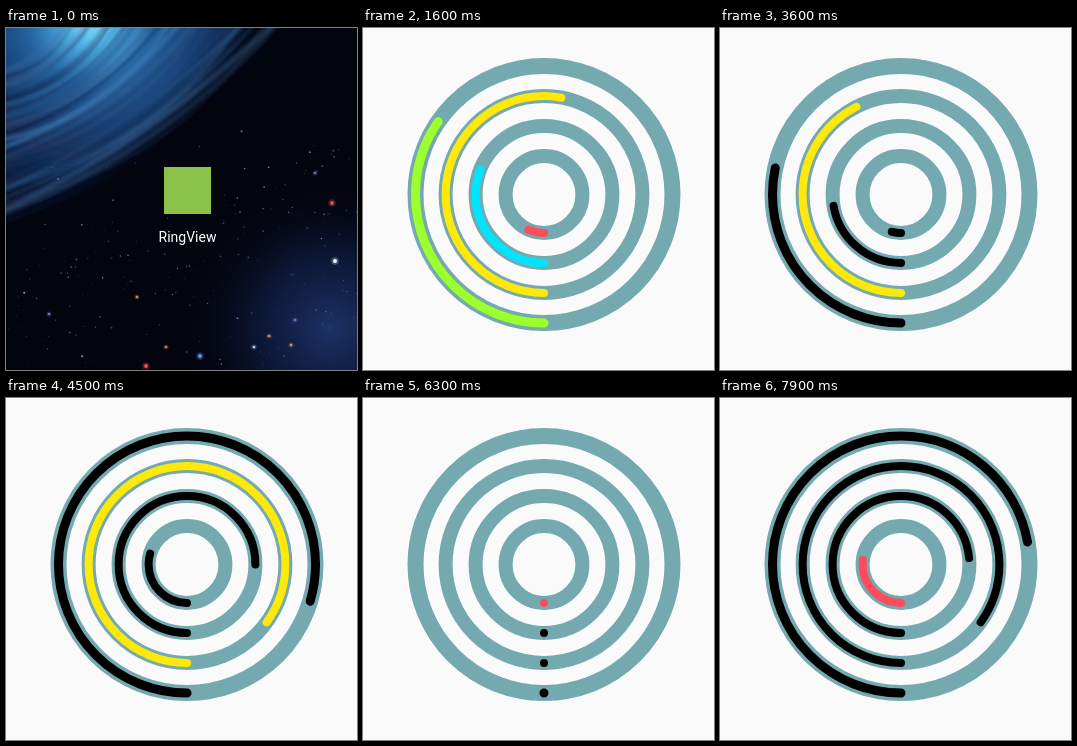
An HTML page that plays this animation: 351 by 342 pixels, repeating every 8000 ms.

```html
<!DOCTYPE html>
<html lang="en">
<head>
<meta charset="utf-8">
<title>Ring view</title>
<style>
  html, body { margin: 0; width: 100%; height: 100%; overflow: hidden; background: #fafafa; }
  svg { display: block; width: 351px; height: 342px; }
  text { font: 14px Roboto, "Open Sans", sans-serif; fill: #fff; text-anchor: middle; }
</style>
</head>
<body>
<svg id="stage" viewBox="0 0 351 342">
  <defs>
    <radialGradient id="nebula" gradientUnits="userSpaceOnUse" cx="85" cy="-8" r="250">
      <stop offset="0" stop-color="#9af0ff"/>
      <stop offset=".1" stop-color="#4fb4ea"/>
      <stop offset=".25" stop-color="#235f9d"/>
      <stop offset=".5" stop-color="#14315f"/>
      <stop offset=".8" stop-color="#0a1630"/>
      <stop offset="1" stop-color="#050917"/>
    </radialGradient>
    <radialGradient id="glow" gradientUnits="userSpaceOnUse" cx="325" cy="300" r="150">
      <stop offset="0" stop-color="#1c3266"/>
      <stop offset=".5" stop-color="#0d1a3c" stop-opacity=".8"/>
      <stop offset="1" stop-color="#03050e" stop-opacity="0"/>
    </radialGradient>
    <filter id="soft" x="-20%" y="-20%" width="140%" height="140%"><feGaussianBlur stdDeviation="9"/></filter>
    <filter id="wisp" x="-20%" y="-20%" width="140%" height="140%"><feGaussianBlur stdDeviation="1.6"/></filter>
  </defs>
  <g id="home">
    <rect width="351" height="342" fill="#03050e"/>
    <rect width="351" height="342" fill="url(#glow)"/>
    <path d="M-40 205Q165 135 262 -40H-40Z" fill="url(#nebula)" filter="url(#soft)"/>
    <g id="streaks" fill="none" filter="url(#wisp)"/>
    <g id="stars"/>
    <rect x="158" y="139" width="47" height="47" fill="#8bc34a"/>
    <text x="181.5" y="214">RingView</text>
  </g>
  <rect id="cover" width="351" height="342" fill="#fafafa"/>
  <g id="rings" fill="none"/>
</svg>
<script>
const LOOP = 8000, STEP = 100, CX = 181, CY = 166.5;
const el = id => document.getElementById(id);

function add(parent, tag, attrs) {
  const node = document.createElementNS("http://www.w3.org/2000/svg", tag);
  for (const key in attrs) node.setAttribute(key, attrs[key]);
  return parent.appendChild(node);
}

let seed = 11;
const random = () => (seed = seed * 16807 % 2147483647) / 2147483647;
const pick = list => list[Math.floor(random() * list.length)];

function drawSky() {
  for (let i = 0; i < 46; i++) {
    const reach = 0.25 + 0.85 * random();
    const y = 185 * reach, x = 275 * reach, bend = 0.5 + 0.2 * random();
    add(el("streaks"), "path", {
      d: `M-20 ${y}Q${x * bend} ${y * bend + 15} ${x} -20`,
      stroke: pick(["#3d7cb8", "#28548c", "#050b1c", "#081226", "#5470a0"]),
      "stroke-width": 1 + 5 * random(),
      opacity: (0.15 + 0.3 * random()) * (1.25 - reach * 0.7)
    });
  }
  // Two diagonal star bands over a faint scatter
  for (let i = 0; i < 300; i++) {
    const x = 351 * random(), spread = random() + random() + random() - 1.5;
    const band = i % 4;
    const y = band === 3 ? 100 + 242 * random()
      : band === 2 ? 385 - 0.33 * x + 50 * spread
      : 300 - 0.43 * x + 70 * spread;
    add(el("stars"), "circle", {
      cx: x, cy: y, r: 0.35 + 0.75 * random() ** 3,
      fill: pick(["#7f8fc8", "#a78a94", "#56699f", "#b9bfd6", "#8a5660"]),
      opacity: 0.25 + 0.6 * random()
    });
  }
  const bright = [
    [326, 175, "#e2593f"], [329, 233, "#fff"], [140, 338, "#ff5148"], [194, 328, "#5b9bff"],
    [160, 319, "#d9776b"], [248, 319, "#b8c9ff"], [131, 269, "#d8863f"], [43, 286, "#8067cf"],
    [263, 308, "#d98a62"], [289, 292, "#8c6bd0"], [285, 317, "#e0875f"], [309, 145, "#6974c0"]
  ];
  bright.forEach(([cx, cy, fill], i) => {
    const r = i < 4 ? 1.9 : 1.3;
    add(el("stars"), "circle", { cx, cy, r: r * 2, fill, opacity: 0.25 });
    add(el("stars"), "circle", { cx, cy, r, fill });
  });
}

const rings = [
  { r: 128.5, track: 16, line: 9, color: "#9cff2e", max: 318, delay: 0, span: 2177, lit: [1, 0, 1, 0] },
  { r: 98.4, track: 14, line: 8, color: "#ffe90a", max: 306, delay: 174, span: 1320, lit: [1, 1, 0, 0] },
  { r: 68.4, track: 14, line: 8, color: "#00e5ff", max: 270, delay: 338, span: 1350, lit: [1, 0, 0, 0] },
  { r: 38.4, track: 14, line: 8, color: "#ff4b5b", max: 108, delay: 528, span: 1307, lit: [1, 0, 1, 1] }
];

// The last run is a restart, which shows its caps before they move
const runs = [
  { start: 663 },
  { start: 2766 },
  { start: 4979 },
  { start: 6300, lag: 35, caps: true }
];

drawSky();
for (const ring of rings) {
  const place = { cx: CX, cy: CY, r: ring.r };
  add(el("rings"), "circle", { ...place, stroke: "#74aaaf", "stroke-width": ring.track });
  ring.arc = add(el("rings"), "circle", {
    ...place, "stroke-width": ring.line, "stroke-linecap": "round",
    pathLength: 360, transform: `rotate(90 ${CX} ${CY})`
  });
}

const ease = p => (1 - Math.cos(Math.PI * Math.min(1, Math.max(0, p)))) / 2;

function render(time) {
  const t = Math.floor(time % LOOP / STEP) * STEP;
  el("home").style.display = t < 900 ? "" : "none";
  el("cover").setAttribute("opacity", t < 700 ? 0 : t < 800 ? 0.4 : t < 900 ? 0.85 : 1);
  el("rings").style.display = t < 1100 ? "none" : "";

  const index = Math.max(0, runs.findLastIndex(run => t >= run.start));
  const { start, lag = 0, caps } = runs[index];
  for (const ring of rings) {
    const sweep = ring.max * ease((t - start - lag - ring.delay) / ring.span);
    ring.arc.style.display = sweep > 0 || caps ? "" : "none";
    ring.arc.setAttribute("stroke", ring.lit[index] ? ring.color : "#000");
    ring.arc.setAttribute("stroke-dasharray", `${Math.max(sweep, 0.01)} 720`);
  }
}

const origin = performance.now();
function tick() {
  render(performance.now() - origin);
  requestAnimationFrame(tick);
}
tick();
</script>
</body>
</html>
```
